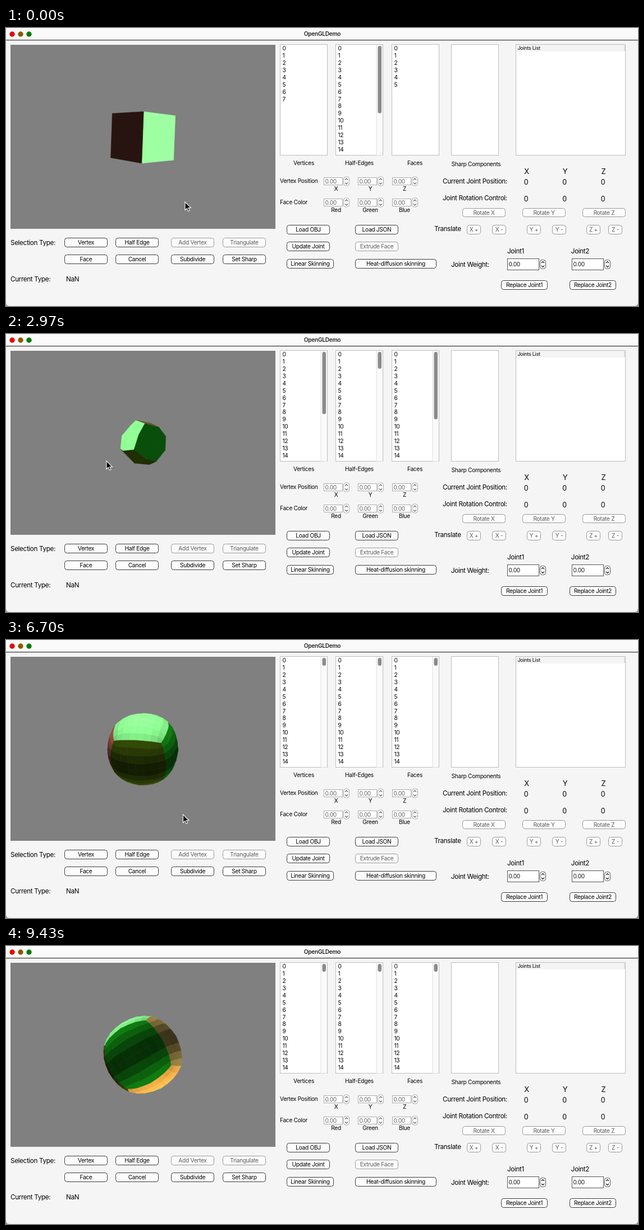
Write an HTML page with a canvas that moves like this. It is 1126 px wide and 497 px high and loops after 9.46 s.

```html
<!DOCTYPE html>
<html lang="en">
<head>
<meta charset="utf-8">
<title>OpenGLDemo</title>
<style>
  html, body { margin: 0; width: 100%; height: 100%; overflow: hidden; background: #999; }
  #window { position: relative; width: 1126px; height: 497px; overflow: hidden; background: #f5f5f5; border-radius: 0 0 6px 6px; }
  svg, canvas { position: absolute; left: 0; top: 0; }
  #view { left: 8px; top: 30px; }
  text { font-family: Inter, Roboto, sans-serif; letter-spacing: -.03em; white-space: pre; }
</style>
</head>
<body>
<div id="window">
  <svg id="ui" width="1126" height="497"></svg>
  <canvas id="view" width="472" height="329"></canvas>
  <svg id="overlay" width="1126" height="497">
    <path id="cursor" d="M0 0V14.5L3.4 11.4 5.6 16.4 8 15.3 5.8 10.5H10.4Z" stroke="#fff" stroke-width="1.1"/>
  </svg>
</div>
<script>
const LOOP = 9460;
const SMALL = 10.2, LARGE = 11.7;
const ui = document.getElementById('ui');
const cursor = document.getElementById('cursor');
const ctx = document.getElementById('view').getContext('2d');

// ---------- interface ----------
let markup = '';
const text = (s, x, y, size = SMALL, anchor = 'start', fill = '#000', weight = 400) =>
  markup += `<text x="${x}" y="${y}" font-size="${size}" text-anchor="${anchor}" fill="${fill}" font-weight="${weight}">${s}</text>`;
const centred = (s, x, y, size) => text(s, x, y, size, 'middle');
const rect = (x, y, w, h, fill, stroke = 'none', rx = 0) =>
  markup += `<rect x="${x}" y="${y}" width="${w}" height="${h}" fill="${fill}" stroke="${stroke}" rx="${rx}"/>`;

function button(label, x, y, w, enabled = true, h = 16) {
  rect(x + .5, y + .5, w - 1, h - 1, '#fcfcfc', enabled ? '#3c3c3c' : '#9a9a9a', 4);
  text(label, x + w / 2, y + h / 2 + 3.7, SMALL, 'middle', enabled ? '#000' : '#5c5c5c');
}

function spinBox(x, y, w, h, ink, line) {
  rect(x + .5, y + .5, w, h, '#fff', line);
  text('0.00', x + 2.5, y + h / 2 + 4.3, SMALL, 'start', ink);
  const sx = x + w + 2, mid = y + h / 2 + .5;
  rect(sx + .5, mid - 8, 10, 16, '#fcfcfc', line, 4);
  markup += `<path d="M${sx + 3} ${mid - 2.5}l2.5-2.5 2.5 2.5m0 5l-2.5 2.5-2.5-2.5" fill="none" stroke="${ink}" stroke-width="1.1"/>`;
}

function buildInterface() {
  rect(0, 0, 1126, 21, '#fafafa');
  rect(0, 21, 1126, 1.2, '#333');
  [['#e30c0c', 11], ['#8a5a00', 26], ['#087a08', 41]].forEach(([c, x]) =>
    markup += `<circle cx="${x}" cy="11" r="4.7" fill="${c}"/>`);
  text('OpenGLDemo', 563.5, 14, SMALL, 'middle', '#222', 600);

  [[488, 84], [587, 84], [687, 84], [793, 84], [908, 195]].forEach(([x, w]) =>
    rect(x + .5, 29.5, w, 198, '#fff', '#bdbdbd'));
  rect(909, 30, 193, 12, '#f4f4f4');
  rect(1101.5, 31, 1, 10, '#c4c4c4');
  text('Joints List', 911.5, 39, 9);
  markup += '<g id="lists"></g>';
  centred('Vertices', 530.5, 245);
  centred('Half-Edges', 629.5, 245);
  centred('Faces', 728.5, 245);
  centred('Sharp Components', 837.5, 246.5);

  text('Vertex Position', 488, 277);
  text('Face Color', 488, 315);
  [['X', 'Red'], ['Y', 'Green'], ['Z', 'Blue']].forEach(([axis, colour], i) => {
    const x = 566 + 61 * i;
    spinBox(x, 267, 33, 13, '#606060', '#aaa');
    spinBox(x, 305, 33, 13, '#606060', '#aaa');
    centred(axis, x + 22, 290.5);
    centred(colour, x + 22, 328.5);
    const cx = 927.5 + 68.5 * i;
    centred(axis, cx, 261, 13);
    centred('0', cx - 1, 279.5, 12.5);
    centred('0', cx - 1, 310, 12.5);
    button('Rotate ' + axis, 813 + 107 * i, 322, 77, false);
    const tx = [821, 928, 1034][i];
    button(axis + ' +', tx, 352, 25, false, 17);
    button(axis + ' -', tx + (i == 2 ? 39 : 45), 352, 25, false, 17);
  });
  text('Current Joint Position:', 778, 277.5, LARGE);
  text('Joint Rotation Control:', 778, 308, LARGE);
  text('Translate', 763, 363, LARGE);
  text('Joint Weight:', 793, 426.5, LARGE);
  [1, 2].forEach(k => {
    const x = 893 + 115 * (k - 1);
    centred('Joint' + k, x + 15, 403, LARGE);
    spinBox(x, 412, 56, 20, '#111', '#555');
    button('Replace Joint' + k, 882 + 122 * (k - 1), 451, 83, true, 17);
  });

  text('Selection Type:', 8, 388, LARGE);
  text('Current Type:', 8, 453, LARGE);
  text('NaN', 107, 453, LARGE);
  [['Vertex', 'Face'], ['Half Edge', 'Cancel'], ['Add Vertex', 'Subdivide'], ['Triangulate', 'Set Sharp']]
    .forEach(([upper, lower], i) => {
      const x = [104, 195, 294, 386][i];
      button(upper, x, 375, 77, i < 2, 17);
      button(lower, x, 405, 77, true, 17);
    });
  button('Load OBJ', 500, 352, 77, true, 17);
  button('Load JSON', 622, 352, 77, true, 17);
  button('Update Joint', 500, 382, 77, true, 17);
  button('Extrude Face', 622, 382, 77, false, 17);
  button('Linear Skinning', 500, 413, 84, true, 17);
  button('Heat-diffusion skinning', 622, 413, 145, true, 17);
  ui.innerHTML = markup;
}

let shownLevel = -1;
function showLists(level) {
  if (level === shownLevel) return;
  shownLevel = level;
  markup = '';
  const { pts, faces } = meshes[level];
  [[488, pts.length], [587, faces.length * 4], [687, faces.length]].forEach(([x, count]) => {
    for (let i = 0; i < Math.min(15, count); i++) text(i, x + 4.5, 40 + 12.93 * i);
    if (count <= 15) return;
    rect(x + 73, 30, 11, 197.5, '#fafafa');
    rect(x + 72.5, 30, 1, 197.5, '#dedede');
    rect(x + 75.5, 32, 6.5, Math.max(14, 2890 / count), '#8b8b8b', 'none', 3.25);
  });
  document.getElementById('lists').innerHTML = markup;
}

// ---------- vectors and mesh ----------
const mix = (a, b, k) => a.map((v, i) => v + (b[i] - v) * k);
const mean = list => [0, 1, 2].map(i => list.reduce((s, p) => s + p[i], 0) / list.length);
const dot = (a, b) => a[0] * b[0] + a[1] * b[1] + a[2] * b[2];
const cross = (a, b) => [a[1] * b[2] - a[2] * b[1], a[2] * b[0] - a[0] * b[2], a[0] * b[1] - a[1] * b[0]];
const unit = a => a.map(v => v / Math.hypot(...a));
const sub = (a, b) => a.map((v, i) => v - b[i]);

const cube = {
  pts: [...Array(8).keys()].map(i => [(i & 1) - .5, (i >> 1 & 1) - .5, (i >> 2) - .5]),
  faces: [
    { v: [4, 5, 7, 6], c: [131, 238, 135] },
    { v: [1, 3, 7, 5], c: [19, 160, 21] },
    { v: [2, 6, 7, 3], c: [198, 172, 88] },
    { v: [0, 4, 6, 2], c: [195, 100, 82] },
    { v: [0, 1, 5, 4], c: [66, 94, 8] },
    { v: [0, 2, 3, 1], c: [240, 172, 70] }
  ]
};

// One Catmull-Clark step; corners are pulled by the smoothed edge points
function subdivide({ pts, faces }) {
  const centres = faces.map(f => mean(f.v.map(i => pts[i])));
  const rings = pts.map(() => ({ centres: [], edges: [] }));
  const edges = new Map();
  const key = (a, b) => Math.min(a, b) * pts.length + Math.max(a, b);
  faces.forEach((f, k) => f.v.forEach((a, j) => {
    const b = f.v[(j + 1) % 4], id = key(a, b);
    if (!edges.has(id)) edges.set(id, { a, b, centres: [], index: pts.length + edges.size });
    edges.get(id).centres.push(centres[k]);
    rings[a].centres.push(centres[k]);
  }));
  const edgePts = [...edges.values()].map(({ a, b, centres }) => {
    const point = mean([pts[a], pts[b], ...centres]);
    rings[a].edges.push(point);
    rings[b].edges.push(point);
    return point;
  });
  const moved = pts.map((p, i) => {
    const F = mean(rings[i].centres), E = mean(rings[i].edges), n = rings[i].edges.length;
    return p.map((v, d) => (F[d] + E[d] + (n - 2) * v) / n);
  });
  const first = pts.length + edges.size;
  return {
    pts: [...moved, ...edgePts, ...centres],
    faces: faces.flatMap((f, k) => f.v.map((a, j) => ({
      c: f.c,
      v: [a, edges.get(key(a, f.v[(j + 1) % 4])).index, first + k, edges.get(key(f.v[(j + 3) % 4], a)).index]
    })))
  };
}

const meshes = [cube];
while (meshes.length < 4) meshes.push(subdivide(meshes.at(-1)));
// Light runs along the model's z axis and reaches both sides
meshes.forEach(({ pts, faces }) => faces.forEach(f => {
  const [a, b, c, d] = f.v.map(i => pts[i]);
  const light = .2 + Math.abs(unit(cross(sub(c, a), sub(d, b)))[2]);
  f.fill = `rgb(${f.c.map(v => Math.min(255, Math.round(v * light)))})`;
}));

// ---------- motion ----------
// Poses: screen directions of the model's z and x axes
const START = [.7, -.04, .71, .71, -.013, -.7];
const TURNED = [.5, -.236, .833, .856, -.02, -.516];
const LEFT = [-.76, .435, .48, .52, .01, .85];
const CORNER = [-.49, .7, .5, .72, 0, .69];
const TOP = [-.06, .83, .55, .98, -.03, .2];
const SIDE = [-.478, .87, -.1, -.24, -.02, .97];
const poseKeys = [
  [0, START], [250, START], [1000, TURNED], [2200, TURNED], [2970, LEFT], [4300, LEFT],
  [4770, CORNER], [5300, TOP], [7250, TOP], [9400, SIDE]
];
const distanceKeys = [[0, [5]], [6250, [5]], [6800, [2.58]]];
const cursorKeys = [
  [0, [319, 311]], [250, [319, 311]], [1000, [285, 302]], [1500, [341, 413]], [1950, [341, 413]],
  [2250, [300, 265]], [2970, [179, 227]], [3250, [179, 227]], [3750, [335, 415]], [4050, [335, 415]],
  [4350, [325, 300]], [4770, [307, 263]], [5300, [302, 225]], [5850, [329.5, 418.5]], [6150, [329.5, 418.5]],
  [6700, [315.5, 312]], [7250, [315.5, 312]], [9100, [170, 300]]
];

function at(keys, t) {
  const i = keys.findIndex(k => k[0] > t);
  if (i < 0) return keys.at(-1)[1];
  const [t0, a] = keys[i - 1], [t1, b] = keys[i];
  const k = (t - t0) / (t1 - t0);
  return mix(a, b, k * k * (3 - 2 * k));
}

function drawMesh({ pts, faces }, pose, distance) {
  const z = unit(pose.slice(0, 3)), rawX = pose.slice(3);
  const along = dot(z, rawX);
  const x = unit(rawX.map((v, i) => v - along * z[i]));
  const y = cross(z, x);
  const screen = pts.map(p => {
    const [px, py, pz] = [0, 1, 2].map(i => p[0] * x[i] + p[1] * y[i] + p[2] * z[i]);
    const scale = 397 / (distance - pz);
    return [236 + px * scale, 164.5 - py * scale];
  });
  ctx.fillStyle = '#808080';
  ctx.fillRect(0, 0, 472, 329);
  ctx.lineWidth = .5;
  for (const f of faces) {
    const [a, b, c, d] = f.v.map(i => screen[i]);
    if ((c[0] - a[0]) * (d[1] - b[1]) >= (c[1] - a[1]) * (d[0] - b[0])) continue;
    ctx.fillStyle = ctx.strokeStyle = f.fill;
    ctx.beginPath();
    [a, b, c, d].forEach(p => ctx.lineTo(...p));
    ctx.closePath();
    ctx.fill();
    ctx.stroke();
  }
}

const levelAt = (t, steps) => steps.filter(s => t >= s).length;

function frame() {
  const t = performance.now() % LOOP;
  drawMesh(meshes[levelAt(t, [1700, 3950, 6050])], at(poseKeys, t), at(distanceKeys, t)[0]);
  showLists(levelAt(t, [1700, 3950, 6130]));
  cursor.setAttribute('transform', `translate(${at(cursorKeys, t)})`);
  cursor.style.display = t < 9100 ? '' : 'none';
  requestAnimationFrame(frame);
}

buildInterface();
frame();
</script>
</body>
</html>
```
